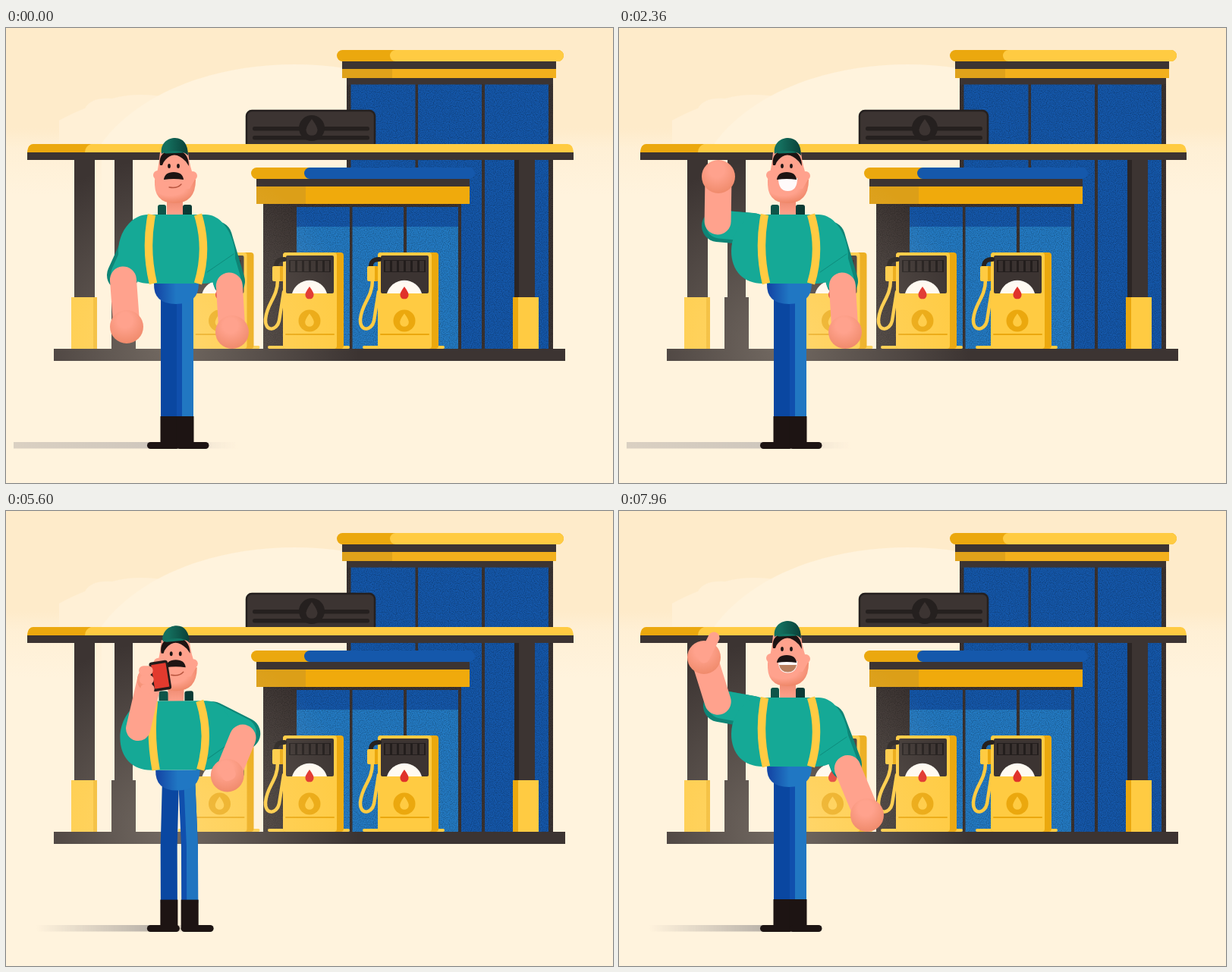
Animation, 800 px wide and 600 px high, one loop 8000 ms. Source, as an HTML page:

```html
<!DOCTYPE html>
<html lang="en">
<head>
<meta charset="utf-8">
<title>Gas station attendant</title>
<style>
html, body { margin: 0; width: 100%; height: 100%; overflow: hidden; background: #fff3dd; }
svg { position: absolute; left: 0; top: 0; width: 100%; height: 100%; }
#scene { will-change: transform; }
</style>
</head>
<body>
<svg id="scene" viewBox="0 0 800 600"></svg>
<svg viewBox="0 0 800 600">
  <defs>
    <radialGradient id="hand" cx=".45" cy=".3" r=".75">
      <stop offset=".3" stop-color="#ffa28d"/><stop offset="1" stop-color="#ee8868"/>
    </radialGradient>
    <radialGradient id="jaw" cx=".38" cy=".3" r=".75">
      <stop offset=".5" stop-color="#ffa28d"/><stop offset="1" stop-color="#ec8363"/>
    </radialGradient>
    <linearGradient id="neck" x2="0" y2="1">
      <stop offset=".3" stop-color="#ee8a70"/><stop offset="1" stop-color="#ffa28d"/>
    </linearGradient>
    <linearGradient id="hips">
      <stop offset=".05" stop-color="#1447a6"/><stop offset=".5" stop-color="#2077c3"/>
    </linearGradient>
    <linearGradient id="cap">
      <stop offset=".2" stop-color="#14705f"/><stop offset="1" stop-color="#0a4038"/>
    </linearGradient>
    <linearGradient id="longShade">
      <stop offset="0" stop-color="#dad0c2"/><stop offset=".6" stop-color="#cfc7bd"/>
      <stop offset="1" stop-color="#e6dccd" stop-opacity="0"/>
    </linearGradient>
    <linearGradient id="softShade">
      <stop offset="0" stop-color="#bbb3aa" stop-opacity="0"/><stop offset=".65" stop-color="#bbb3aa"/>
      <stop offset="1" stop-color="#d8cfc3" stop-opacity="0"/>
    </linearGradient>
  </defs>
  <g id="man"></g>
</svg>
<script>
const DARK = '#3c3432', BLUE = '#1558ab', SKY = '#247bc4', GOLD = '#eba80e', SUN = '#ffcb42';
const SKIN = '#ffa28d', TEAL = '#15a996', BLACK = '#1d1413';

const rect = (x, y, w, h, fill, rx = 0) =>
  `<rect x="${x}" y="${y}" width="${w}" height="${h}" rx="${rx}" fill="${fill}"/>`;
const path = (d, fill, extra = '') => `<path d="${d}" fill="${fill}" ${extra}/>`;
const line = (d, color, w, extra = '') =>
  path(d, 'none', `stroke="${color}" stroke-width="${w}" stroke-linecap="round" stroke-linejoin="round" ${extra}`);
const ball = (x, y, r, fill, ry = r) => `<ellipse cx="${x}" cy="${y}" rx="${r}" ry="${ry}" fill="${fill}"/>`;
const drop = (x, y, s, fill) =>
  path(`M${x},${y - s}Q${x + s * .75},${y} ${x + s * .6},${y + s * .35}A${s * .62},${s * .62} 0 0 1 ${x - s * .6},${y + s * .35}Q${x - s * .75},${y} ${x},${y - s}Z`, fill);

/* ---------- station ---------- */
function pump(dx, hose) {
  let s = rect(345, 419, 108, 4, SUN, 2) + rect(365, 296, 80, 127, GOLD, 4) + rect(365, 296, 71, 127, SUN, 4);
  s += rect(369, 300, 63, 50, DARK, 2) + rect(373, 306, 55, 16, '#231e1d');
  for (let i = 0; i < 6; i++) s += rect(375 + i * 9, 307, 6, 14, '#3a3230');
  s += path('M377,350A24,24 0 0 1 423,350Z', '#fffaf2') + drop(400, 350, 9, '#e0322b');
  s += ball(400, 386, 14.5, GOLD) + drop(400, 386, 9.5, SUN) + line('M369,404H432', GOLD, 2);
  if (hose) {
    s += line('M367,305Q355,305 356,316', '#26211f', 6);
    s += line('M358,332C358,356 344,362 342,384C341,401 357,400 360,386L366,348', SUN, 4.5);
    s += rect(351, 314, 14, 20, SUN, 2) + rect(361, 314, 4, 20, GOLD, 1);
  }
  return `<g transform="translate(${dx} 0)">${s}</g>`;
}

function station() {
  let s = `<defs>
    <linearGradient id="air" x2="0" y2="1"><stop offset=".6" stop-color="#feebca"/>
      <stop offset=".72" stop-color="#feebca" stop-opacity=".4"/><stop offset="1" stop-color="#feebca" stop-opacity="0"/></linearGradient>
    <radialGradient id="glow"><stop offset="0" stop-color="#fff3dd" stop-opacity=".28"/>
      <stop offset="1" stop-color="#fff3dd" stop-opacity="0"/></radialGradient>
    <filter id="grain" color-interpolation-filters="sRGB"><feTurbulence type="fractalNoise" baseFrequency=".9" seed="4"/>
      <feColorMatrix values="0 0 0 0 0  0 0 0 0 0  0 0 0 0 0  0 .7 0 0 -.28"/>
      <feComposite in2="SourceGraphic" operator="in"/>
      <feMerge><feMergeNode in="SourceGraphic"/><feMergeNode/></feMerge></filter>
  </defs>`;
  s += rect(0, 0, 800, 600, '#fff3dd') + rect(0, 0, 800, 220, 'url(#air)');
  s += path('M70,152V122Q88,112 104,106Q112,91 140,93Q165,86 196,89Q220,90 228,104L240,152Z', '#fff0d6');
  s += path('M126,152C175,85 275,48 380,48S590,85 640,160V230H126Z', '#fff3dd');

  // tower
  let glass = rect(449, 66, 272, 357, BLUE);
  for (const [x, w] of [[449, 5.5], [539.5, 3.5], [627, 4], [715, 6]]) glass += rect(x, 66, w, 357, DARK);
  s += `<g filter="url(#grain)">${glass}</g>` + rect(449, 66, 272, 8.5, DARK);
  s += rect(436, 29, 299, 15, GOLD, 7.5) + rect(506, 29, 229, 15, SUN, 7.5);
  s += rect(443, 44, 282, 10, DARK) + rect(443, 54, 282, 12, '#dfa21a') + rect(509, 54, 216, 12, '#f2b01c');

  // shop
  s += rect(323, 184, 150, 15, GOLD, 7.5) + rect(393, 184, 225, 15, BLUE, 7.5);
  let shop = rect(339, 232, 261, 191, BLUE) + rect(383, 262, 214, 161, SKY);
  shop += rect(339, 232, 44, 191, DARK) + rect(339, 232, 261, 4, DARK);
  for (const [x, w] of [[453, 3.5], [524, 4], [596, 4]]) shop += rect(x, 232, w, 191, DARK);
  s += `<g filter="url(#grain)">${shop}</g>`;
  s += rect(330, 199, 281, 10, DARK) + rect(330, 209, 281, 23, '#dc9f18') + rect(395, 209, 216, 23, '#f0aa0c');

  // sign
  s += `<rect x="317" y="109" width="169" height="52" rx="7" fill="${DARK}" stroke="#25201f" stroke-width="2.5"/>`;
  s += rect(325, 130, 154, 5.5, '#25201f', 2.5) + rect(325, 142, 154, 5.5, '#25201f', 2.5);
  s += ball(403, 132, 17, '#25201f') + drop(403, 132, 12, DARK);

  // canopy and posts
  s += rect(90, 170, 27, 186, DARK) + rect(143, 170, 24, 186, DARK);
  s += rect(670, 170, 27, 186, DARK) + rect(670, 170, 6, 186, '#2b2524');
  s += rect(139, 355, 32, 68, DARK) + rect(86, 355, 34, 68, SUN) + rect(115, 355, 5, 68, '#f3b92a');
  s += rect(668, 355, 34, 68, SUN) + rect(668, 355, 7, 68, GOLD);
  s += pump(-118.5, false) + pump(0, true) + pump(125, true) + rect(63, 423, 674, 16, DARK);
  s += ball(215, 420, 250, 'url(#glow)');
  s += path('M28,164Q29,153 36,153H740Q747,153 748,164Z', SUN);
  s += path('M28,164Q29,153 36,153H112Q104,156 104,164Z', GOLD) + rect(28, 164, 720, 10, DARK);
  return s;
}
document.getElementById('scene').innerHTML = station();

/* ---------- poses ---------- */
// limb: shoulder, elbow, forearm angle and length, fist radius, finger offset
function limb(wrap, sx, sy, ex, ey, hx, hy, r = 22, fx = 0, fy = 0) {
  let a = Math.atan2(hy - ey, hx - ex);
  if (wrap && a < 0) a += 2 * Math.PI;
  return [sx, sy, ex, ey, a, Math.hypot(hx - ex, hy - ey), r, fx, fy];
}
const left = (...p) => limb(true, ...p), right = (...p) => limb(false, ...p);

const idle = {
  body: [225, 246, 0, 1], head: [222, 208, 0], look: 0, turn: 0, eye: 1, mouth: 0, tongue: 0, phone: 0,
  legs: [215, 355, 215, 440, 215, 236, 355, 236, 440, 236],
  L: left(178, 273, 154, 326, 159, 394), R: right(277, 276, 294, 334, 298, 401)
};
const wave = { ...idle, mouth: 1, L: left(176, 265, 130, 261, 131, 196) };
const laugh = {
  ...idle, body: [225, 257, 0, 1], head: [219, 224, -1], look: -3, eye: 0, mouth: 1.1,
  legs: [216, 362, 212, 430, 215, 241, 362, 240, 430, 237],
  L: left(178, 282, 128, 288, 79, 248), R: right(277, 286, 294, 344, 299, 411)
};
const laughUp = { ...laugh, L: left(176, 276, 130, 272, 124, 207) };
const swing = { ...wave, L: left(176, 265, 130, 265, 92, 212) };
const cheer = {
  ...idle, body: [230, 284, -6, .94], head: [224, 247, 0], look: 7, turn: 1, eye: 0,
  legs: [229, 392, 212, 461, 214, 252, 388, 287, 460, 290],
  L: left(188, 325, 215, 342, 232, 294), R: right(285, 310, 315, 324, 316, 279)
};
const dip = {
  ...cheer, body: [230, 288, -4, .94], head: [225, 252, 1],
  L: left(188, 328, 215, 346, 234, 299), R: right(285, 314, 315, 326, 312, 284)
};
const point = {
  ...cheer, body: [237, 285, -3, .92], head: [237, 247, 0], look: 9, eye: 1,
  legs: [231, 392, 212, 461, 214, 257, 390, 288, 460, 290],
  L: left(191, 328, 226, 345, 270, 327, 19, 27, 0), R: right(290, 312, 324, 313, 361, 272, 21, 32, -14)
};
const call = {
  ...idle, phone: 1, head: [222, 210, 0],
  L: left(178, 275, 166, 286, 174, 211, 16), R: right(270, 267, 313, 291, 272, 335)
};
const thumb = {
  ...idle, mouth: .9, tongue: 1,
  L: left(176, 265, 132, 257, 112, 193, 22, 13, -26), R: right(277, 276, 299, 334, 327, 401)
};

const keys = [
  [0, idle], [240, idle], [720, wave], [1000, laughUp], [1290, laugh], [1420, laugh], [1700, laughUp],
  [2000, swing], [2280, wave], [2460, wave], [2960, cheer], [3200, cheer], [3440, dip], [3700, cheer],
  [4220, point], [5240, point], [5760, call], [6860, call], [7440, thumb], [8000, thumb]
];

const mix = (a, b, k) => {
  if (typeof a === 'number') return a + (b - a) * k;
  if (Array.isArray(a)) return a.map((v, i) => mix(v, b[i], k));
  return Object.fromEntries(Object.keys(a).map(n => [n, mix(a[n], b[n], k)]));
};
const ease = k => k < .5 ? 4 * k * k * k : 1 - (2 - 2 * k) ** 3 / 2;

function poseAt(t) {
  let i = 1;
  while (i < keys.length - 1 && t >= keys[i][0]) i++;
  const [t0, a] = keys[i - 1], [t1, b] = keys[i];
  return mix(a, b, ease((t - t0) / (t1 - t0)));
}

/* ---------- attendant ---------- */
function sleeve([sx, sy, ex, ey], side) {
  const d = (x, y) => `M${sx + x},${sy + y}L${ex + x},${ey + y}`;
  return line(d(0, 0), '#0e8576', 42) + line(d(3 * side, -2), TEAL, 37);
}

function forearm([, , ex, ey, a, len, r, fx, fy], phone) {
  const c = Math.cos(a), s = Math.sin(a), hx = ex + c * len, hy = ey + s * len;
  let out = line(`M${ex + 6 * c},${ey + 6 * s}L${hx},${hy}`, SKIN, 35 - phone * 3) + ball(hx, hy, r, 'url(#hand)');
  if (Math.hypot(fx, fy) > 1) out += line(`M${hx},${hy}l${fx},${fy}`, SKIN, 15);
  if (phone > .01) {
    out += `<g transform="translate(${hx + 14} ${hy - 5}) rotate(-9) scale(${phone})">`
      + rect(-14, -22, 28, 44, '#241c1b', 4) + rect(-11, -18, 22, 36, '#e23a2e', 1) + '</g>';
    for (let i = 0; i < 3; i++)
      out += line(`M${hx - 8 + i},${hy - 12 + i * 12}h${7 * phone}`, SKIN, 14 * phone);
  }
  return out;
}

function legs([ax, ay, bx, by, cx, dx, dy, ex, ey, fx], turn) {
  const leg = (x, y, kx, ky, a, o = 0) => `M${x + o},${y}L${kx + o},${ky}L${a + o},516`;
  const top = 512 + 5 * turn;
  const boot = (a, foot) => rect(a - 11.5, top, 23, 552 - top, BLACK) + rect(foot, 546, 43, 9, BLACK, 4.5);
  return line(leg(ax, ay, bx, by, cx), '#0a47a1', 22)
    + line(leg(dx, dy, ex, ey, fx), '#104fad', 22)
    + line(leg(dx, dy, ex, ey, fx, 3.5), '#2177c2', 15, `opacity="${1 - turn * .5}"`)
    + boot(cx, cx - 29) + boot(fx, fx - 11.5);
}

function torso([x, y, r, sx], t) {
  const strap = (a, c, b) => line(`M${a},0Q${c},45 ${b},91`, SUN, 10.5, 'style="stroke-linecap:butt"');
  return `<g transform="translate(${x} ${y}) rotate(${r}) scale(${sx} 1)">`
    + path('M-30,91H29Q29,118 -1,118T-30,91Z', 'url(#hips)')
    + path(`M-25,0v-10q0,-3 3,-3h${5 + 10 * t}q3,0 3,3v10z`, '#0e5549')
    + path(`M${8 + 10 * t},0v-10q0,-3 3,-3h${6 - 3 * t}q3,0 3,3v10z`, '#0b3a35')
    + path('M-38,0H38C62,0 77,32 77,55C77,76 55,91 36,91H-36C-60,91 -77,75 -77,48C-77,24 -60,0 -38,0Z', TEAL)
    + line('M75,52L40,76', '#0e8b7c', 1, `opacity="${1 - t}"`)
    + line('M-70,30L-25,50', '#0e8b7c', 1, `opacity="${t}"`)
    + strap(-33 + 12 * t, -42 + 38 * t, -31 + 13 * t) + strap(28 + 10 * t, 42 + 14 * t, 28 + 14 * t) + '</g>';
}

function face(p) {
  const { look, eye, mouth, tongue } = p, k = Math.min(1, mouth);
  let s = ball(-7, -26, 3 - 1.1 * eye, BLACK, .8 + 2.2 * eye) + ball(5, -26, 3 - 1.1 * eye, BLACK, .8 + 2.2 * eye);
  s += line('M-7,2Q4,4 9,-2', '#b8553f', 1.4, `opacity="${1 - k}"`);
  if (mouth > .02) {
    s += path(`M-12,-10H13Q13,${-9 + 16 * mouth} .5,${-9 + 16 * mouth}T-12,-10Z`, '#fffafa');
    s += path(`M-11,-5H12Q10,${-9 + 15 * mouth} .5,${-9 + 15 * mouth}T-11,-5Z`, '#b9805f', `opacity="${tongue}"`);
  }
  s += path('M-14,-8Q-13,-18 -1,-18T12,-8Q-1,-10 -14,-8Z', BLACK);
  return `<g transform="translate(${look} 0)">${s}</g>`;
}

function head(p) {
  const [x, y, r] = p.head, t = p.turn;
  let s = ball(-22 - 6 * t, -14 - 2 * t, 6 + 3 * t, SKIN) + ball(24 - 8 * t, -13, 6, SKIN);
  s += path('M-26,-8Q-28,23 0,23T28,-8Z', 'url(#jaw)');
  s += path('M-19,-44H18Q20,-24 27,-8L20,4H-20L-26,-8Q-21,-20 -19,-44Z', SKIN);
  const hair = path('M-19,-27C-21,-42 -12,-47 0,-47S19,-40 19,-26L15,-32Q0,-48 -12,-34Q-15,-31 -16,-27Z', BLACK);
  s += `<g transform="translate(${-4 * t} 0) rotate(${-14 * t} 0 -40)">${hair}</g>`;
  s += line(`M${-11 - 8 * t},${-48 + 9 * t}L${11 - 14 * t},-49`, '#127563', 11);
  s += `<g transform="translate(${t} 0) rotate(${-8 * t} 0 -50)">`
    + path('M-17,-42C-19,-56 -9,-63 1,-63C12,-63 18,-54 18,-40Q11,-47 -2,-46Q-11,-46 -17,-42Z', 'url(#cap)') + '</g>';
  return `<g transform="translate(${x} ${y}) rotate(${r})">${s}${face(p)}</g>`;
}

function neck({ head: [hx, hy], body: [bx, by], turn }) {
  const x = bx - 3 - 2 * turn;
  return path(`M${hx - 10},${hy + 10}L${x - 10},${by + 1}H${x + 11}L${hx + 11},${hy + 10}Z`, 'url(#neck)');
}

function attendant(p, t) {
  const soft = Math.min(1, Math.max(0, (t - 2460) / 500));
  return `<g opacity="${1 - soft}">${rect(10, 546, 295, 8.5, 'url(#longShade)')}</g>`
    + `<g opacity="${soft}">${rect(40, 546, 230, 8.5, 'url(#softShade)')}</g>`
    + legs(p.legs, p.turn) + sleeve(p.R, -1) + sleeve(p.L, 1) + neck(p) + torso(p.body, p.turn)
    + head(p) + forearm(p.R, 0) + forearm(p.L, p.phone);
}

const man = document.getElementById('man');
const start = performance.now();
function frame() {
  const t = (performance.now() - start) % 8000;
  man.innerHTML = attendant(poseAt(t), t);
  requestAnimationFrame(frame);
}
frame();
</script>
</body>
</html>
```
